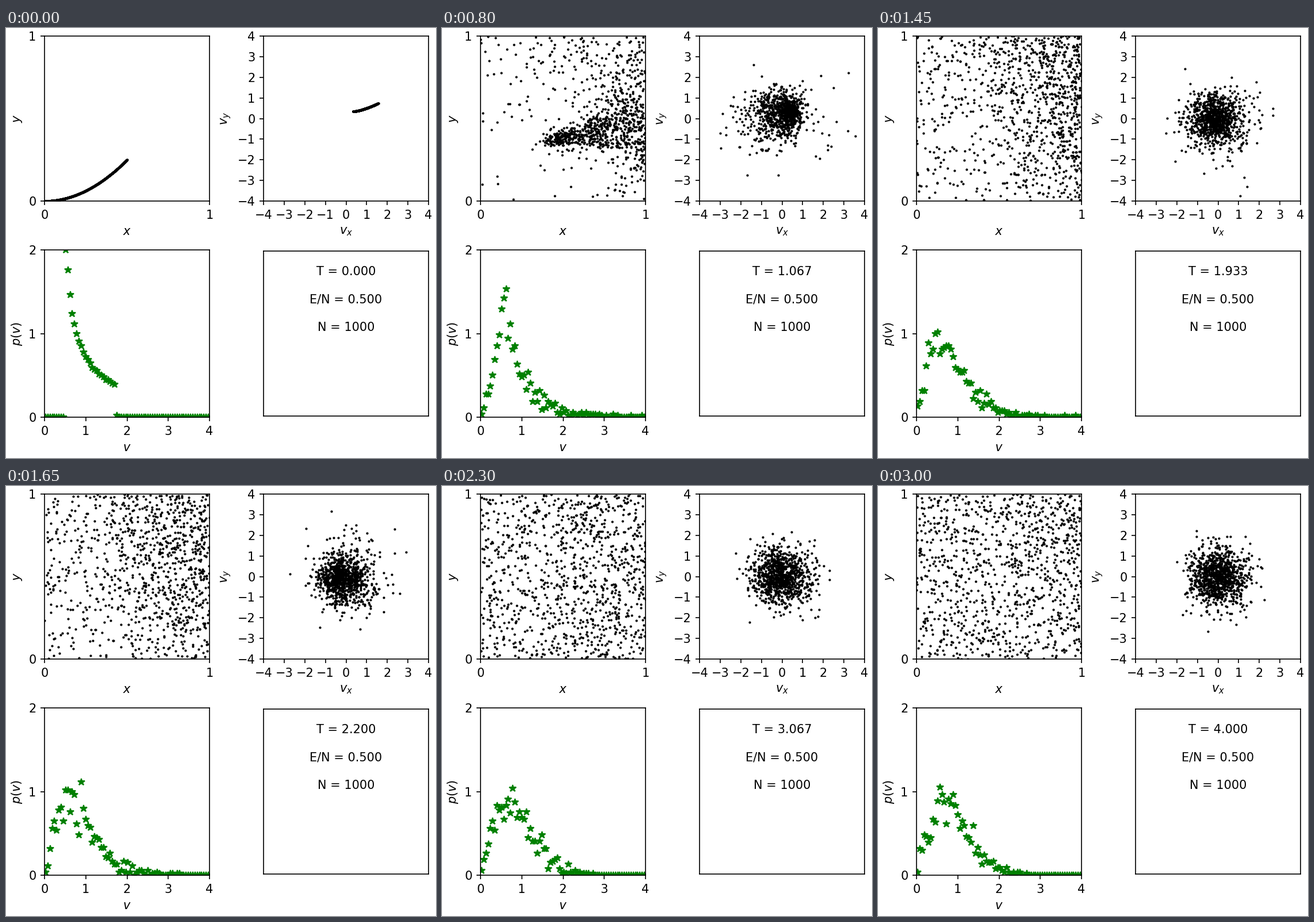
A matplotlib script that plays this animation: 748 px wide and 748 px high, repeating every 3.05 s.

```python
import numpy as np
import matplotlib.pyplot as plt
from matplotlib.animation import FuncAnimation

SIZE, DPI = 748, 150
FRAMES, INTERVAL = 61, 50
N = 1000
DT = 1 / 15          # simulated time per frame
SUBSTEPS = 8
GRID = 10            # collision cells per side
DIAMETER = 0.012     # collision cross-section in 2D
EDGES = np.linspace(0, 4, 75)
CENTERS = (EDGES[:-1] + EDGES[1:]) / 2


def initial_state():
    x = np.linspace(0, 0.5, N)
    pos = np.column_stack([x, x ** 2])
    vel = np.exp(3 * pos)
    vel /= np.sqrt((vel ** 2).sum() / N)   # energy per particle = 1/2
    return pos, vel


def move(pos, vel, dt):
    """Free flight with mirror reflection at the walls."""
    pos += vel * dt
    out = (pos < 0) | (pos > 1)
    vel[out] *= -1
    pos[:] = 1 - np.abs(1 - np.abs(pos))


def collide(pos, vel, dt, rng):
    """Random pairs sharing a cell scatter isotropically."""
    ij = np.minimum((pos * GRID).astype(int), GRID - 1)
    cell = ij[:, 0] * GRID + ij[:, 1]
    count = np.bincount(cell, minlength=GRID ** 2)
    start = np.cumsum(count) - count
    order = rng.permutation(N)
    order = order[np.argsort(cell[order], kind="stable")]
    c = cell[order]
    rank = np.arange(N) - start[c]
    first = np.flatnonzero((rank % 2 == 0) & (rank + 1 < count[c]))
    a, b = order[first], order[first + 1]
    speed = np.hypot(*(vel[a] - vel[b]).T)
    chance = (count[cell[a]] - 1) * DIAMETER * speed * dt * GRID ** 2
    hit = rng.random(len(a)) < chance
    a, b, speed = a[hit], b[hit], speed[hit]
    angle = rng.uniform(0, 2 * np.pi, len(a))
    half = np.column_stack([np.cos(angle), np.sin(angle)]) * speed[:, None] / 2
    mean = (vel[a] + vel[b]) / 2
    vel[a], vel[b] = mean + half, mean - half


def simulate():
    rng = np.random.default_rng(5)
    pos, vel = initial_state()
    states = [(pos.copy(), vel.copy())]
    dt = DT / SUBSTEPS
    for _ in range(FRAMES - 1):
        for _ in range(SUBSTEPS):
            move(pos, vel, dt)
            collide(pos, vel, dt, rng)
        states.append((pos.copy(), vel.copy()))
    return states


plt.rcParams.update({"font.family": "DejaVu Sans", "font.size": 10})
fig = plt.figure(figsize=(SIZE / DPI, SIZE / DPI), dpi=DPI, facecolor="white")


def panel(left, top, right, bottom, xlim, ylim, xlabel="", ylabel=""):
    ax = fig.add_axes([left / SIZE, 1 - bottom / SIZE,
                       (right - left) / SIZE, (bottom - top) / SIZE])
    ax.set(xlim=xlim, ylim=ylim, xlabel=xlabel, ylabel=ylabel,
           xticks=range(xlim[0], xlim[1] + 1),
           yticks=range(ylim[0], ylim[1] + 1))
    return ax


ax_pos = panel(67, 14, 354, 301, (0, 1), (0, 1), "$x$", "$y$")
ax_vel = panel(448, 14, 735, 301, (-4, 4), (-4, 4), "$v_x$", "$v_y$")
ax_hist = panel(67, 386, 354, 677, (0, 4), (0, 2), "$v$", "$p(v)$")
ax_info = panel(448, 388, 735, 675, (0, 1), (0, 1))
ax_info.set(xticks=[], yticks=[])

dots, = ax_pos.plot([], [], "k.", ms=2)
vdots, = ax_vel.plot([], [], "k.", ms=2)
stars, = ax_hist.plot([], [], "g*", ms=6)


def info(y, text):
    return ax_info.text(0.5, y, text, ha="center", va="baseline")


clock = info(0.855, "")
info(0.686, "E/N = 0.500")
info(0.517, f"N = {N}")

states = simulate()


def update(i):
    pos, vel = states[i]
    dots.set_data(pos[:, 0], pos[:, 1])
    vdots.set_data(vel[:, 0], vel[:, 1])
    counts, _ = np.histogram(np.hypot(vel[:, 0], vel[:, 1]), EDGES)
    stars.set_data(CENTERS, counts / (N * (EDGES[1] - EDGES[0])))
    clock.set_text(f"T = {i * DT:.3f}")
    return dots, vdots, stars, clock


anim = FuncAnimation(fig, update, frames=FRAMES, interval=INTERVAL,
                     repeat=True, repeat_delay=0)
plt.show()
```
